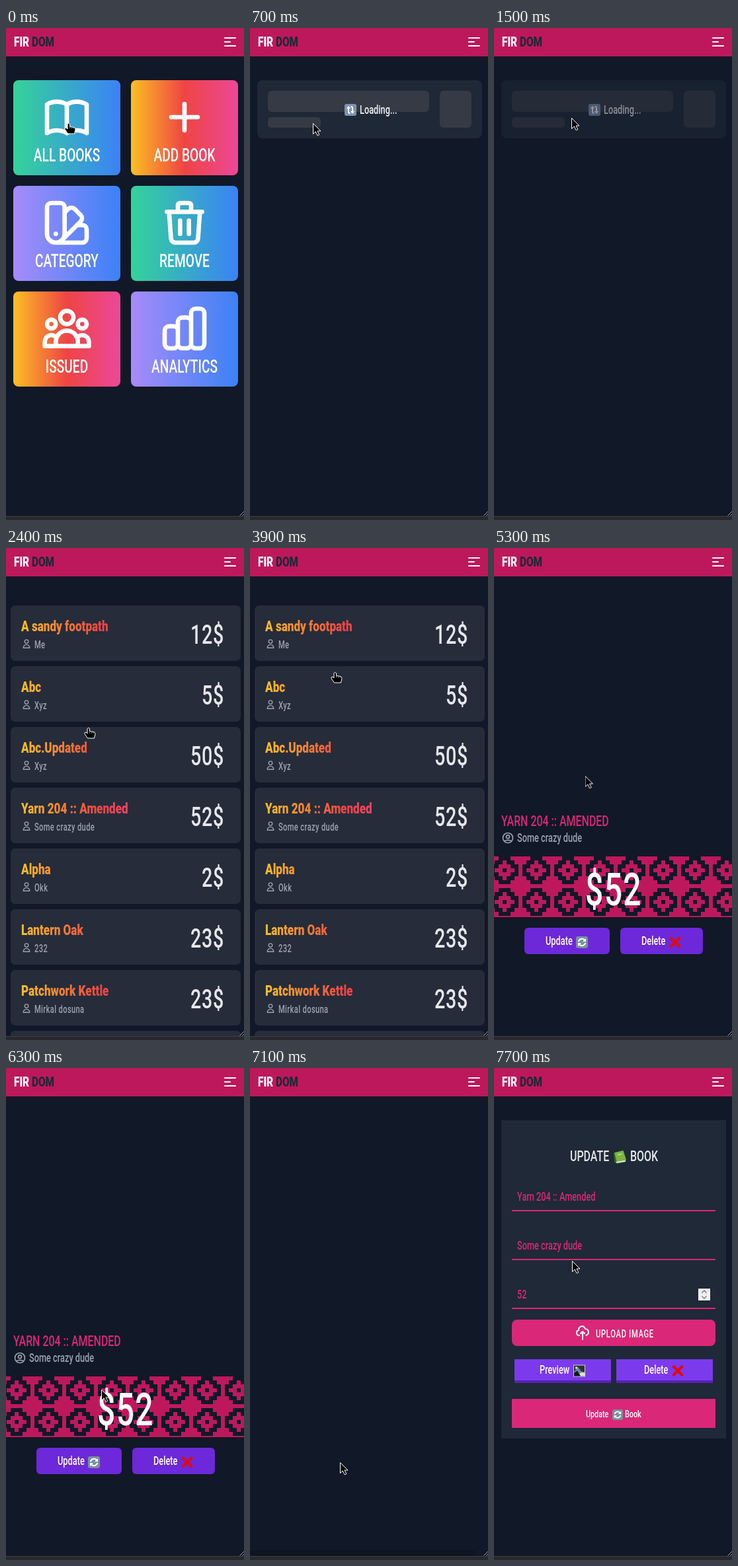
Recreate the animation shown at these times as an HTML page. Size 360x745 px, loop 8000 ms.

```html
<!DOCTYPE html>
<html lang="en">
<head>
<meta charset="utf-8">
<title>Library app</title>
<style>
html, body { margin: 0; width: 100%; height: 100%; overflow: hidden; background: #111827; }
svg { display: block; width: 100%; height: 100%; }
text { font-family: Roboto, "Liberation Sans", sans-serif; font-weight: 500; white-space: pre; }
.bold { font-weight: 800; }
.line { fill: none; stroke: #fff; stroke-width: 2; stroke-linecap: round; stroke-linejoin: round; }

/* every part shares one 8 s clock */
.step { animation: 8s step-end infinite; }
#home { animation-name: home; }
#load { animation-name: load; }
#list { animation-name: list; }
#wait { animation-name: wait; }
#detail { animation-name: detail; }
#blank { animation-name: blank; }
#form { animation-name: form; }
#hand { animation-name: hand; }
#arrow { animation-name: arrow; }
#spin { animation-name: spin; }
#hover { animation-name: hover; }
#pulse { animation: pulse 8s cubic-bezier(.4, 0, .6, 1) infinite; }
#cursor { animation: path 8s infinite; }

@keyframes home { 0% { visibility: visible } 8.75%, to { visibility: hidden } }
@keyframes load { 0%, 20%, to { visibility: hidden } 8.75% { visibility: visible } }
@keyframes list { 0%, 65%, to { visibility: hidden } 20% { visibility: visible } }
@keyframes wait { 0%, 65%, to { visibility: hidden } 57.5% { visibility: visible } }
@keyframes detail { 0%, 87.5%, to { visibility: hidden } 65% { visibility: visible } }
@keyframes blank { 0%, 96.25%, to { visibility: hidden } 87.5% { visibility: visible } }
@keyframes form { 0% { visibility: hidden } 96.25%, to { visibility: visible } }
@keyframes hand {
  0%, 20%, 81.25% { visibility: visible }
  8.75%, 57.5%, 87.5%, to { visibility: hidden }
}
@keyframes arrow {
  0%, 20%, 81.25% { visibility: hidden }
  8.75%, 57.5%, 87.5%, to { visibility: visible }
}
@keyframes spin { 0%, to { transform: rotate(2deg) } 60% { transform: rotate(62deg) } }
@keyframes hover { 0%, 87.5%, to { fill: #6d28d9 } 81.25% { fill: #5b21b6 } }
@keyframes pulse { 0%, 8.75% { opacity: 1 } 21.25%, to { opacity: .5 } }
</style>
</head>
<body>
<svg id="stage" viewBox="0 0 360 745" xmlns="http://www.w3.org/2000/svg"></svg>
<script>
const icons = {
  book: 'M12 6.253v13m0-13C10.832 5.477 9.246 5 7.5 5S4.168 5.477 3 6.253v13C4.168 18.477 5.754 18 7.5 18s3.332.477 4.5 1.253m0-13C13.168 5.477 14.754 5 16.5 5c1.747 0 3.332.477 4.5 1.253v13C19.832 18.477 18.247 18 16.5 18c-1.746 0-3.332.477-4.5 1.253',
  plus: 'M12 6v12M6 12h12',
  swatch: 'M7 21a4 4 0 01-4-4V5a2 2 0 012-2h4a2 2 0 012 2v12a4 4 0 01-4 4zm0 0h12a2 2 0 002-2v-4a2 2 0 00-2-2h-2.343M11 7.343l1.657-1.657a2 2 0 012.828 0l2.829 2.829a2 2 0 010 2.828l-8.486 8.485M7 17h.01',
  trash: 'M19 7l-.867 12.142A2 2 0 0116.138 21H7.862a2 2 0 01-1.995-1.858L5 7m5 4v6m4-6v6m1-10V4a1 1 0 00-1-1h-4a1 1 0 00-1 1v3M4 7h16',
  group: 'M17 20h5v-2a3 3 0 00-5.356-1.857M17 20H7m10 0v-2c0-.656-.126-1.283-.356-1.857M7 20H2v-2a3 3 0 015.356-1.857M7 20v-2c0-.656.126-1.283.356-1.857m0 0a5.002 5.002 0 019.288 0M15 7a3 3 0 11-6 0 3 3 0 016 0zm6 3a2 2 0 11-4 0 2 2 0 014 0zM7 10a2 2 0 11-4 0 2 2 0 014 0z',
  chart: 'M9 19v-6a2 2 0 00-2-2H5a2 2 0 00-2 2v6a2 2 0 002 2h2a2 2 0 002-2zm0 0V9a2 2 0 012-2h2a2 2 0 012 2v10m-6 0a2 2 0 002 2h2a2 2 0 002-2m0 0V5a2 2 0 012-2h2a2 2 0 012 2v14a2 2 0 01-2 2h-2a2 2 0 01-2-2z',
  user: 'M16 7a4 4 0 11-8 0 4 4 0 018 0zM12 14a7 7 0 00-7 7h14a7 7 0 00-7-7z',
  badge: 'M5.121 17.804A13.937 13.937 0 0112 16c2.5 0 4.847.655 6.879 1.804M15 10a3 3 0 11-6 0 3 3 0 016 0zm6 2a9 9 0 11-18 0 9 9 0 0118 0z',
  cloud: 'M7 16a4 4 0 01-.88-7.903A5 5 0 1115.9 6L16 6a5 5 0 011 9.9M15 13l-3-3m0 0l-3 3m3-3v12'
};

const box = (x, y, w, h, fill, r = 0, more = '') =>
  `<rect x="${x}" y="${y}" width="${w}" height="${h}" rx="${r}" fill="${fill}" ${more}/>`;

// Icon on a 24 unit grid, centred on cx, cy
const icon = (name, cx, cy, size, color = '#fff') =>
  `<path class="line" style="stroke:${color}" d="${icons[name]}"
    transform="translate(${cx} ${cy}) scale(${size / 24}) translate(-12 -12)"/>`;

// Condensed lettering: one ratio for each weight
function label(x, y, size, str, { fill = '#fff', anchor = 'start', bold = false, gap = 0 } = {}) {
  return `<g transform="translate(${x} ${y}) scale(${bold ? .75 : .7} 1)">
    <text class="${bold ? 'bold' : ''}" font-size="${size * 1.14}" fill="${fill}"
      text-anchor="${anchor}" letter-spacing="${gap}">${str}</text></g>`;
}

const use = (id, x, y, size = 18) =>
  `<use href="#${id}" transform="translate(${x} ${y}) scale(${size / 18})"/>`;

const scene = (id, body) => `<g id="${id}" class="step">${body}</g>`;

const ramp = (id, colors, more = '') =>
  `<linearGradient id="${id}" ${more}>${colors.map((c, i) =>
    `<stop offset="${i / (colors.length - 1)}" stop-color="${c}"/>`).join('')}</linearGradient>`;

const sunset = ['#fbbf24', '#ef4444', '#ec4899'];
const defs = `<defs>
  ${ramp('sea', ['#34d399', '#3b82f6'])}
  ${ramp('sun', sunset)}
  ${ramp('sky', ['#a78bfa', '#3b82f6'])}
  ${ramp('ink', sunset, 'gradientUnits="userSpaceOnUse" x1="0" x2="320"')}
  <pattern id="weave" x="40" y="512" width="48" height="48" patternUnits="userSpaceOnUse">
    <g fill="#be185d" shape-rendering="crispEdges">
      <path d="M0 -3h48v6H0zM0 45h48v3H0zM-3 0h6v48h-6zM45 0h3v48h-3z"/>
      ${[0, 48].map(x => [0, 48].map(y => `<path transform="translate(${x} ${y})"
        d="M-15 -9h30v18h-30zM-9 -15h18v30h-18z"/>`).join('')).join('')}
      <path fill-rule="evenodd" transform="translate(24 24)"
        d="M-3 -15h6v6h6v6h6v6h-6v6h-6v6h-6v-6h-6v-6h-6v-6h6v-6h6zM-3 -3h6v6h-6z"/>
    </g>
  </pattern>
  <g id="sync">
    ${box(0, 0, 18, 18, '#78909c', 3)}
    <path fill="none" stroke="#fff" stroke-width="2" d="M3.8 8A5.4 5.4 0 0 1 13 5.5M14.2 10A5.4 5.4 0 0 1 5 12.5"/>
    <path fill="#fff" d="M15 3v5h-5zM3 15v-5h5z"/>
  </g>
  <g id="swap">
    ${box(0, 0, 18, 18, '#7c93b4', 3)}
    <path fill="none" stroke="#fff" stroke-width="2" d="M6 6v6q0 2 2.5 2M12 12V6q0-2-2.5-2"/>
    <path fill="#fff" d="M2.8 7L6 3l3.2 4zM8.8 11l3.2 4 3.2-4z"/>
  </g>
  <path id="cross" fill="none" stroke="#e00b0b" stroke-width="4" d="M1.5 1.5l15 15M16.5 1.5l-15 15"/>
  <g id="green">
    <path fill="#33691e" d="M1 3L13 0l5 13-1 3-12 2-3-2z"/>
    <path fill="#e8ead8" d="M4 15l13-2v2L5 17z"/>
    <path fill="#7cb342" d="M2 3L14 0l4 12.5L5 15z"/>
    <path fill="#aed581" d="M6 5l6-1.5.6 2-6 1.5z"/>
  </g>
  <g id="photo">
    ${box(0, 0, 18, 18, '#d8d3c4')}
    ${box(1, 1, 16, 16, '#27333f')}
    <path fill="#6e8aa5" d="M1 11L7 3l5 7 5 1v6H1z"/>
    <path fill="#e6e1c8" d="M9 17q0-7 8-5v5zM3 3h3v3H3z"/>
    <path fill="#111820" d="M1 17v-5l5-3 5 8z"/>
  </g>
</defs>`;

const tiles = [
  ['ALL BOOKS', 'book', 'sea'], ['ADD BOOK', 'plus', 'sun'],
  ['CATEGORY', 'swatch', 'sky'], ['REMOVE', 'trash', 'sea'],
  ['ISSUED', 'group', 'sun'], ['ANALYTICS', 'chart', 'sky']
];
const home = tiles.map(([name, pic, paint], i) => {
  const x = 11 + i % 2 * 178, y = 79 + (i >> 1) * 160;
  return box(x, y, 162, 144, `url(#${paint})`, 8) + icon(pic, x + 81, y + 56, 80) +
    label(x + 81, y + 122.5, 24, name, { anchor: 'middle' });
}).join('');

const bone = '#373b46';
const load = `<g id="pulse">
  ${box(11, 79, 340, 88, '#1f2937', 8)}
  ${box(27, 95, 244, 32, bone, 6)}${box(27, 135, 80, 16, bone, 5)}${box(287, 95, 48, 56, bone, 6)}
  ${use('swap', 143, 115)}${label(166, 130, 16, 'Loading...', { fill: '#f0f1f3' })}</g>`;

const books = [
  ['A sandy footpath', 'Me', 12], ['Abc', 'Xyz', 5], ['Abc.Updated', 'Xyz', 50],
  ['Yarn 204 :: Amended', 'Some crazy dude', 52], ['Alpha', 'Okk', 2],
  ['Lantern Oak', '232', 23], ['Patchwork Kettle', 'Mirkal dosuna', 23]
];
const grey = '#9ca3af';
const list = books.map(([name, by, cost], i) => {
  const y = 87 + i * 92;
  return box(7, y, 348, 84, '#262c3a', 7) +
    label(23, y + 39, 20, name, { fill: 'url(#ink)', bold: true }) +
    icon('user', 31, y + 58, 16.5, grey) +
    label(43, y + 64.5, 14, by, { fill: grey, gap: .5 }) +
    label(330, y + 58, 36, cost + '$', { fill: '#e5e7eb', anchor: 'end', gap: 1 });
}).join('') + '<path fill="#262c3a" d="M7 739v-2q0-6 7-6h334q7 0 7 6v2z"/>';

const wait = `${box(0, 0, 360, 739, '#000', 0, 'opacity=".7"')}
  <g transform="translate(181 369)"><path id="spin" class="step" fill="#ec4899"
    d="M0 0L-22 -23A32 32 0 0 1 22 -23ZM0 0L22 23A32 32 0 0 1 -22 23Z"/></g>`;

const pink = '#db2777';
const detail = label(11, 421, 20, 'YARN 204 :: AMENDED', { fill: pink }) +
  icon('badge', 21, 439, 20, grey) +
  label(35, 445, 16, 'Some crazy dude', { fill: grey }) +
  box(0, 467, 360, 92, 'url(#weave)') + box(0, 557, 360, 2, '#be185d') +
  label(181, 541, 60, '$52', { anchor: 'middle', gap: 2 }) +
  box(46, 575, 129, 40, '#6d28d9', 6, 'id="hover" class="step"') +
  label(78, 601, 16, 'Update') + use('sync', 124, 588) +
  box(191, 575, 125, 40, '#6d28d9', 6) +
  label(223, 601, 16, 'Delete') + use('cross', 265, 588);

const field = (y, str) => label(35, y, 16, str, { fill: pink }) + box(27, y + 14, 308, 2, pink);
const button = (x, str, tx, pic, px) =>
  box(x, 441, 146, 36, '#7c3aed') + box(x, 473, 146, 4, '#5b21b6') +
  label(tx, 463, 16, str) + use(pic, px, 449.5);
const form = box(11, 79, 340, 482, '#1f2937') +
  label(115, 141, 20, 'UPDATE', { fill: '#e5e7eb' }) + use('green', 180, 125, 20) +
  label(206, 141, 20, 'BOOK', { fill: '#e5e7eb' }) +
  field(201, 'Yarn 204 :: Amended') + field(275, 'Some crazy dude') + field(349, '52') +
  box(309, 334, 18, 18, '#efefef') +
  '<path fill="none" stroke="#777" stroke-width="1.3" d="M314.5 340.5l3.5-3.5 3.5 3.5M314.5 345.5l3.5 3.5 3.5-3.5"/>' +
  box(27, 381, 308, 40, pink, 8) + icon('cloud', 134, 401, 24) +
  label(154, 407.5, 14, 'UPLOAD IMAGE', { gap: 1 }) +
  button(31, 'Preview', 69, 'photo', 120) + button(185, 'Delete', 227, 'cross', 269) +
  box(27, 501, 308, 44, pink) +
  label(139, 529, 13.5, 'Update') + use('sync', 179, 517, 16) + label(198, 529, 13.5, 'Book');

const frame = box(0, 0, 360, 43, '#be185d') +
  label(12, 28, 18, 'FIR', { bold: true }) + label(39, 28, 18, 'DOM', { bold: true, fill: '#1f2937' }) +
  '<path class="line" d="M331 15h16M331 21h8M331 27h16"/>';
const edge = box(0, 739, 360, 6, '#29292d') + box(0, 739, 360, 1, '#3d3d41') +
  '<path stroke="#a0a3a8" d="M353.5 738.5l6.5-6.5M357.5 738.5l2.5-2.5"/>';

const cursor = `<g id="cursor" stroke="#fff" fill="#000" stroke-linejoin="round">
  <path id="arrow" class="step" d="M.5 .5V16.5L4.3 13L7.2 18.8L9.8 17.6L7 12H12Z"/>
  <g id="hand" class="step">
    <path d="M-2 1.5Q-.3 -1 1.5 1.5V5.5L8 6.5Q10 7 10 9.5L8.5 16H-1.5L-6 9.5Q-6.5 6.5 -4 7L-2 9Z"/>
    <path fill="none" stroke="#aaa" stroke-width=".7" d="M1.5 5.5v3M4.5 6.5v2.5M7.2 7v2"/>
  </g></g>`;

// Pointer stops: ms, x, y; it advances once every 100 ms
const stops = [
  [0, 95, 144], [800, 95, 144], [1500, 117, 136], [1700, 118, 135], [2100, 125, 318],
  [2400, 125, 272], [2900, 125, 272], [3500, 116, 120], [3800, 126, 134], [3900, 129, 188],
  [4000, 129, 188], [4100, 140, 300], [4200, 107, 390], [5100, 107, 390], [5200, 124, 366],
  [5300, 137.5, 345], [6000, 150, 404], [6700, 136, 597], [7600, 136, 597], [7700, 118, 292],
  [8000, 118, 292]
];
const path = stops.map(([ms, x, y], i) => {
  const n = i + 1 < stops.length ? (stops[i + 1][0] - ms) / 100 : 1;
  return `${ms / 80}% { transform: translate(${x}px, ${y}px); animation-timing-function: steps(${n}) }`;
}).join('\n');

document.head.appendChild(document.createElement('style')).textContent = `@keyframes path { ${path} }`;
document.getElementById('stage').innerHTML = defs + box(0, 0, 360, 745, '#111827') + frame +
  scene('home', home) + scene('load', load) + scene('list', list) + scene('detail', detail) +
  scene('blank', box(0, 731, 342, 7, '#0e1420', 3)) + scene('form', form) + scene('wait', wait) +
  edge + cursor;
</script>
</body>
</html>
```
